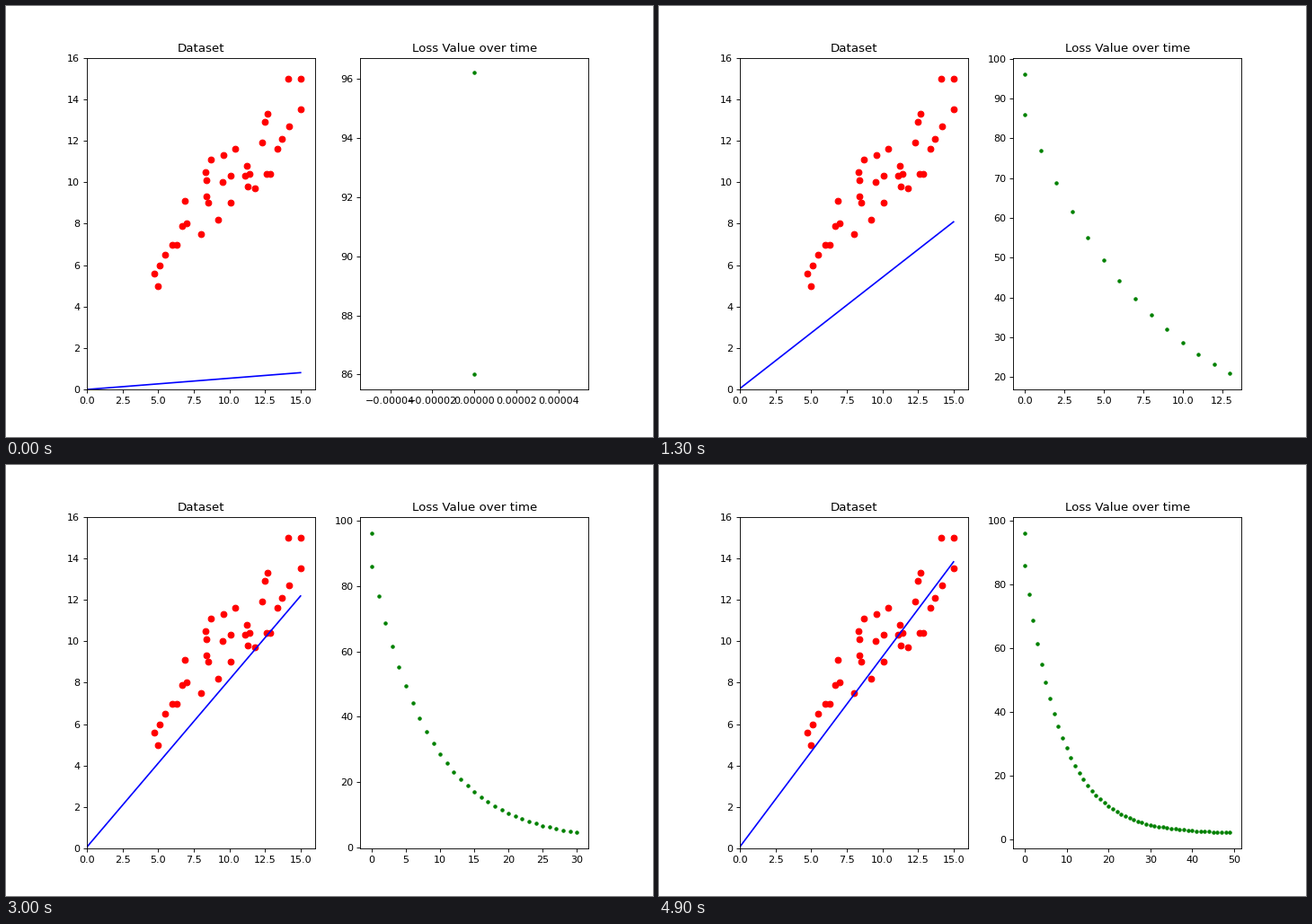
Write a matplotlib script that moves like this. It is 720 px wide and 480 px high and loops after 5 s.

```python
import numpy as np
import matplotlib.pyplot as plt
from matplotlib.animation import FuncAnimation

FRAMES, INTERVAL = 50, 100

POINTS = np.array([
    (4.75, 5.6), (5, 5), (5.1, 6), (5.5, 6.5), (6, 7), (6.3, 7), (6.7, 7.9),
    (6.9, 9.1), (7, 8), (8, 7.5), (8.3, 10.5), (8.4, 10.1), (8.4, 9.3),
    (8.5, 9), (8.7, 11.1), (9.2, 8.2), (9.5, 10), (9.6, 11.3), (10.1, 10.3),
    (10.1, 9), (10.4, 11.6), (11.1, 10.3), (11.2, 10.8), (11.3, 9.8),
    (11.4, 10.4), (11.8, 9.7), (12.3, 11.9), (12.5, 12.9), (12.6, 10.4),
    (12.7, 13.3), (12.9, 10.4), (13.4, 11.6), (13.7, 12.1), (14.1, 15),
    (14.2, 12.7), (15, 15), (15, 13.5),
])

# Gradient descent from zero: the squared error shrinks by DECAY per epoch.
DECAY = 0.8917
SLOPE, INTERCEPT = 14.57 / 15, 0.09
LOSS_FLOOR, LOSS_SPAN = 1.95, 84.05

steps = np.arange(FRAMES + 1) - 1
epochs = np.maximum(steps, 0)
losses = LOSS_FLOOR + LOSS_SPAN * DECAY ** steps


def padded_limits(values, dot_fraction):
    """Limits per epoch: dot radius at the previous scale plus a 5% margin."""
    limits, span = [], 1.0
    for count in range(1, len(values) + 1):
        seen = values[:count]
        pad = dot_fraction * span
        low, high = seen.min() - pad, seen.max() + pad
        margin = 0.05 * (high - low)
        limits.append((low - margin, high + margin))
        span = 1.1 * (high - low)
    return limits[1:]


fig, (data_ax, loss_ax) = plt.subplots(1, 2, figsize=(9, 6), dpi=80)
fig.subplots_adjust(left=0.125, right=0.9, bottom=0.11, top=0.88, wspace=0.2)

data_ax.set_title("Dataset")
data_ax.set(xlim=(0, 16), ylim=(0, 16))
data_ax.scatter(*POINTS.T, s=36, color="r")
fit_line, = data_ax.plot([], [], "b-", lw=1.5)

loss_ax.set_title("Loss Value over time")
loss_ax.ticklabel_format(style="plain", useOffset=False)
loss_dots = loss_ax.scatter([], [], s=36, marker=".", color="g")

dot_radius = 1.2
box = loss_ax.get_position()
x_limits = padded_limits(epochs, dot_radius / (box.width * 720))
y_limits = padded_limits(losses, dot_radius / (box.height * 480))


def update(epoch):
    progress = 1 - DECAY ** ((epoch + 1) / 2)
    x = np.array([0, 15])
    fit_line.set_data(x, progress * (SLOPE * x + INTERCEPT))
    shown = slice(0, epoch + 2)
    loss_dots.set_offsets(np.column_stack([epochs[shown], losses[shown]]))
    loss_ax.set(xlim=x_limits[epoch], ylim=y_limits[epoch])
    return fit_line, loss_dots


animation = FuncAnimation(fig, update, frames=FRAMES, interval=INTERVAL,
                          init_func=lambda: update(0), repeat=True,
                          repeat_delay=0, blit=False)
plt.show()
```
